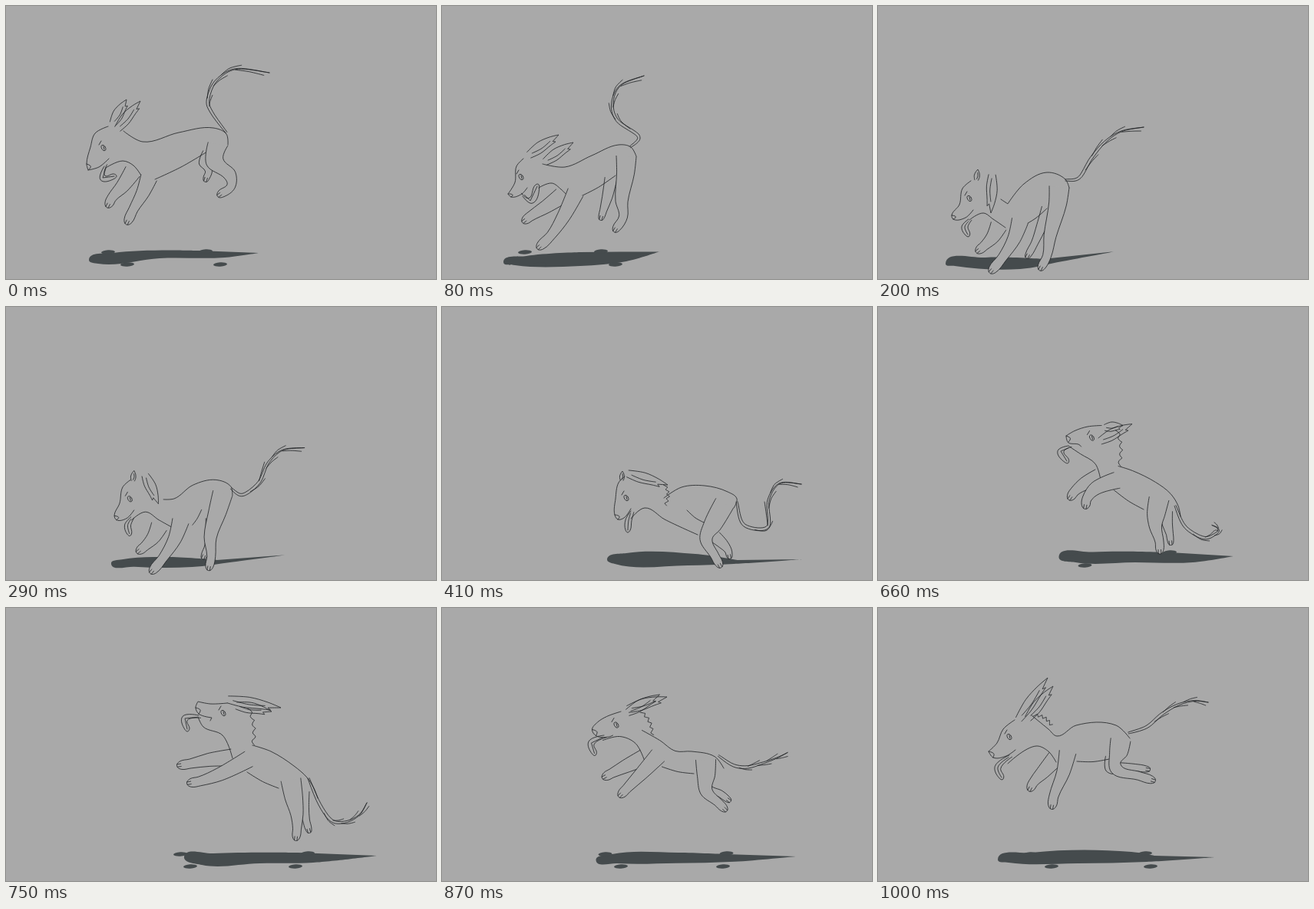
These frames come from a looping animation (560x356 px, 1.12 s). An HTML page with a canvas:

```html
<!DOCTYPE html>
<html lang="en">
<head>
<meta charset="utf-8">
<title>Leaping dog</title>
<style>
html, body { margin: 0; width: 100%; height: 100%; overflow: hidden; background: #a9a9a9; }
canvas { display: block; }
</style>
</head>
<body>
<canvas id="stage" width="560" height="356"></canvas>
<script>
const PAPER = '#a9a9a9', INK = '#1d2022', SHADE = '#454b4d';
const LOOP = 1120;
const ctx = document.getElementById('stage').getContext('2d');

// A pose is a rig: guide points for each part, outlines come from the rules below.
const pose = parts => Object.fromEntries(Object.entries(parts).map(
  ([name, text]) => [name, text.split(',').map(p => p.split(' ').map(Number))]));

const leap = pose({
  shadow: '329 322,285 328,200 329,120 336,108 331,140 322,250 319',
  farFore: '165 216,151 236,138 250,134 258',
  farHind: '264 192,258 206,264 215,261 224',
  fore: '186 224,178 244,166 265,159 280',
  hind: '276 180,272 203,292 221,293 235,280 245',
  tail: '287 165,268 139,263 122,274 97,300 82,343 87',
  back: '153 163,178 177,225 165,270 159,287 167,289 181',
  belly: '262 190,194 226',
  jaw: '130 211,152 202,166 208,179 226',
  face: '133 157,116 166,110 184,105 206,107 214,121 210,134 199',
  tongue: '128 209,126 224,141 222',
  farEar: '139 153,157 122', ear: '145 160,175 124', eye: '127 185'
});
const land = pose({
  shadow: '284 320,240 333,180 339,95 338,80 334,110 326,180 321',
  farFore: '155 248,135 262,114 275,109 279',
  farHind: '220 225,215 250,210 267,208 274',
  fore: '174 243,158 275,142 299,128 313',
  hind: '240 196,239 218,234 255,236 275,227 290',
  tail: '245 184,256 170,228 149,222 125,233 103,263 91',
  back: '131 206,160 210,195 195,230 181,246 184,253 196',
  belly: '226 221,181 248',
  jaw: '126 237,143 231,155 239,164 248',
  face: '106 199,97 209,95 230,86 245,90 249,104 245,111 237',
  tongue: '105 248,115 254,124 235',
  farEar: '113 194,152 168', ear: '134 203,171 178', eye: '103 223'
});
const stand = pose({
  shadow: '309 320,240 333,185 343,100 339,88 336,140 328,215 330',
  farFore: '157 287,149 302,138 313,132 318',
  farHind: '221 264,213 287,204 309,196 324',
  fore: '185 280,177 304,162 328,149 344',
  hind: '236 236,234 258,224 300,220 326,213 340',
  tail: '244 227,262 224,278 198,297 176,318 163,346 158',
  back: '160 252,169 258,190 232,220 217,244 226,249 237',
  belly: '220 264,190 286',
  jaw: '119 279,137 270,150 278,166 289',
  face: '121 228,110 238,106 259,96 273,98 278,114 276,124 266',
  tongue: '118 278,113 288,117 298',
  farEar: '128 227,130 213', ear: '149 220,147 270', eye: '119 251'
});
const crouch = pose({
  shadow: '469 329,380 335,320 337,225 335,215 329,240 321,330 322,385 330',
  farHind: '356 300,366 309,373 318,374 323',
  hind: '368 256,352 285,344 303,355 324,361 335',
  tail: '384 254,393 284,424 287,425 252,440 230,468 231',
  back: '289 249,312 235,342 233,372 241,384 250,380 262',
  belly: '319 265,341 281',
  jaw: '246 276,264 262,290 277,333 297',
  face: '238 221,230 229,226 250,225 271,229 277,237 275,246 263',
  tongue: '246 266,243 278,242 291',
  farEar: '234 226,235 214', ear: '242 217,294 232', eye: '240 249',
  mane: '290 232,290 259'
});
const rear = pose({
  shadow: '443 327,420 334,340 333,260 331,239 327,290 319,380 321',
  farFore: '281 249,274 263,272 278,275 289',
  farHind: '364 295,366 308,369 316,368 322',
  fore: '306 255,287 257,292 274,300 288',
  hind: '361 276,349 294,344 304,354 324,356 335',
  tail: '380 296,392 318,425 325,441 310,425 307,400 315',
  back: '305 236,318 240,348 251,370 266,381 284,382 298',
  belly: '300 263,337 293',
  jaw: '247 221,270 228,284 243,284 250',
  face: '294 185,280 187,262 201,243 206,244 215,256 216,263 217',
  tongue: '245 222,243 232,256 244',
  farEar: '290 187,292 174', ear: '289 230,304 175', eye: '274 204',
  mane: '306 191,306 236'
});
const launch = pose({
  shadow: '483 323,400 332,330 333,255 335,232 324,270 320,380 319',
  farFore: '294 195,264 198,240 203,228 205',
  farHind: '387 240,388 260,391 277,394 288',
  fore: '316 197,278 217,252 226,241 228',
  hind: '371 224,375 248,379 270,379 288,378 298',
  tail: '394 222,408 255,424 277,442 279,460 270,470 254',
  back: '321 179,345 187,375 206,392 221,401 235,406 248',
  belly: '314 214,355 235',
  jaw: '250 142,257 155,282 166,295 196',
  face: '288 124,266 125,250 122,247 130,251 138,268 143,266 147',
  tongue: '251 140,233 144,236 158',
  farEar: '300 127,346 135', ear: '289 119,358 130', eye: '283 137',
  mane: '316 131,321 179'
});
const glide = pose({
  shadow: '439 325,350 331,260 333,170 332,156 328,200 319,330 318,360 323',
  farFore: '231 196,214 215,202 228,199 234',
  farHind: '304 196,300 207,335 208,349 210',
  fore: '247 188,241 215,229 245,227 257',
  hind: '316 172,313 190,310 209,340 219,356 224',
  tail: '326 163,350 155,370 138,391 126,412 121,430 123',
  back: '200 140,222 158,233 167,258 153,310 153,328 170',
  belly: '259 200,301 197',
  jaw: '169 203,206 180,222 187,232 201',
  face: '178 146,163 158,155 176,144 187,150 195,167 193,179 185',
  tongue: '171 192,156 208,161 221',
  farEar: '183 145,221 91', ear: '195 144,228 102', eye: '171 168',
  mane: '203 140,226 154'
});

// start, pose, next pose, mix, sideways shift
const timeline = [
  [0, leap], [80, land], [160, land, stand, .5, -9], [200, stand],
  [290, stand, crouch, .35], [350, stand, crouch, .7], [410, crouch], [540, rear],
  [660, rear, launch, .5], [750, launch], [870, launch, glide, .5], [1000, glide]
];

const mix = (a, b, k) => [a[0] + (b[0] - a[0]) * k, a[1] + (b[1] - a[1]) * k];

function unit(a, b) {
  const x = b[0] - a[0], y = b[1] - a[1], l = Math.hypot(x, y) || 1;
  return [x / l, y / l];
}

// Point moved along direction d and across it.
const off = (p, d, along, across) =>
  [p[0] + d[0] * along - d[1] * across, p[1] + d[1] * along + d[0] * across];

const heading = (p, i) => unit(p[Math.max(i - 1, 0)], p[Math.min(i + 1, p.length - 1)]);

function pick(pts, u) {
  if (pts.length < 2) return pts[0];
  const x = u * (pts.length - 1), i = Math.min(Math.floor(x), pts.length - 2);
  return mix(pts[i], pts[i + 1], x - i);
}

function blend(a, b, k) {
  const n = Math.max(a.length, b.length), last = Math.max(n - 1, 1);
  return Array.from({ length: n }, (_, i) => mix(pick(a, i / last), pick(b, i / last), k));
}

// Smooth curve through points; turns beyond the limit stay sharp.
function trace(p, limit = .25) {
  const slope = i => {
    if (!i || i === p.length - 1) return [0, 0];
    const u = unit(p[i - 1], p[i]), v = unit(p[i], p[i + 1]);
    return u[0] * v[0] + u[1] * v[1] < limit ? [0, 0] : unit([0, 0], [u[0] + v[0], u[1] + v[1]]);
  };
  const path = new Path2D();
  path.moveTo(...p[0]);
  for (let i = 1; i < p.length; i++) {
    const d = Math.hypot(p[i][0] - p[i - 1][0], p[i][1] - p[i - 1][1]) / 3;
    path.bezierCurveTo(...off(p[i - 1], slope(i - 1), d, 0), ...off(p[i], slope(i), -d, 0), ...p[i]);
  }
  return path;
}

function line(p, limit) { ctx.stroke(trace(p, limit)); }

function leg(p, widths) {
  const end = p.length - 1, d = heading(p, end);
  const side = s => p.map((q, i) => off(q, heading(p, i), 0, s * widths[i]));
  const path = trace([...side(1), off(p[end], d, 5, 2), off(p[end], d, 5, -2), ...side(-1).reverse()], -.5);
  ctx.fill(path);
  ctx.stroke(path);
  for (const s of [-1.5, 2]) line([off(p[end], d, 0, s), off(p[end], d, 5, s)]);
}

function resample(p, n) {
  const at = i => p[Math.max(0, Math.min(p.length - 1, i))];
  return Array.from({ length: n + 1 }, (_, j) => {
    const x = j / n * (p.length - 1), i = Math.min(Math.floor(x), p.length - 2), t = x - i;
    return [0, 1].map(c => {
      const [a, b, e, f] = [at(i - 1)[c], at(i)[c], at(i + 1)[c], at(i + 2)[c]];
      return b + t / 2 * (e - a + t * (2 * a - 5 * b + 4 * e - f + t * (3 * (b - e) + f - a)));
    });
  });
}

function tail(p) {
  const n = 24, s = resample(p, n);
  for (const side of [-1, 1]) {
    line(s.map((q, i) => off(q, heading(s, i), 0, side * (1 + 2 * Math.sin(Math.PI * i / n)) * (1 - i / n))));
  }
  // Loose hairs leave the edges and sweep towards the tip.
  for (let i = 7; i < n - 4; i += 3) {
    const side = i % 2 ? 1 : -1;
    line([off(s[i], heading(s, i), 0, side), off(s[i + 2], heading(s, i + 2), 0, side * 3),
      off(s[i + 4], heading(s, i + 4), 0, side * 4.5)]);
  }
}

function ear([base, tip]) {
  const d = unit(base, tip), len = Math.hypot(tip[0] - base[0], tip[1] - base[1]);
  const w = Math.min(7, len * .25), at = (u, v) => off(base, d, u * len, v * w);
  const shape = [at(0, .7), at(.3, 1), at(.65, .8)];
  if (len > 20) shape.push(at(.82, .75), at(.76, .4));
  line([...shape, at(1, 0), at(.75, -.6), at(.4, -1), at(0, -.6)]);
  line([at(.1, .1), at(.4, .35), at(.7, .1)]);
}

function mane([from, to]) {
  const d = unit(from, to), len = Math.hypot(to[0] - from[0], to[1] - from[1]), n = 9;
  line(Array.from({ length: n + 1 }, (_, i) =>
    off(from, d, len * i / n, -4 * Math.sin(Math.PI * i / n) + (i % 2 ? -2.5 : 1.5))));
}

function head(rig) {
  const f = rig.face, [x, y] = rig.eye[0], [root, mid, tip] = rig.tongue;
  line(f);
  line([f[3], off(mix(f[3], f[4], .4), [1, 0], 4.5, 0), f[4]], -1);
  const d = heading(rig.tongue, 1), e = heading(rig.tongue, 2);
  line([root, off(mid, d, 0, 4), off(tip, e, 0, 3), off(tip, e, 3, 0),
    off(tip, e, 0, -3), off(mid, d, 0, -4), off(root, d, 1, -4)], -1);
  line([off(root, d, 3, 0), mid, tip]);
  ctx.beginPath();
  ctx.ellipse(x, y, 2.5, 4, -.5, 0, 7);
  ctx.moveTo(x, y - 2);
  ctx.lineTo(x + 1, y + 2);
  ctx.moveTo(x - 6, y - 4);
  ctx.lineTo(x - 3, y - 9);
  ctx.stroke();
}

function shadow(rig) {
  ctx.fillStyle = SHADE;
  ctx.fill(trace(rig.shadow, -1));
  for (const [name, y] of [['fore', 337], ['hind', 337], ['farFore', 321], ['farHind', 320]]) {
    const paw = rig[name]?.at(-1);
    if (!paw || paw[1] > 316) continue;
    ctx.beginPath();
    ctx.ellipse(paw[0] - 1, y, 9, 2.8, -.06, 0, 7);
    ctx.fill();
  }
  ctx.fillStyle = PAPER;
}

const foreWidths = [11, 8.5, 6, 5.5], hindWidths = [13, 11.5, 8, 5.5, 5], farWidths = [8, 6.5, 4.5, 4];

function dog(rig) {
  shadow(rig);
  if (rig.farFore) leg(rig.farFore, foreWidths);
  leg(rig.farHind, farWidths);
  tail(rig.tail);
  line(rig.back);
  const [a, b] = rig.belly, [mx, my] = mix(a, b, .5);
  line([a, [mx, my + 2], b]);
  line(rig.jaw);
  leg(rig.hind, hindWidths);
  if (rig.fore) leg(rig.fore, foreWidths);
  ear(rig.farEar);
  ear(rig.ear);
  if (rig.mane) mane(rig.mane);
  head(rig);
}

function between(a, b, k) {
  const move = [b.eye[0][0] - a.eye[0][0], b.eye[0][1] - a.eye[0][1]];
  const rig = {};
  for (const name in a) {
    // A part hidden in the next pose travels along with the head.
    rig[name] = blend(a[name], b[name] || a[name].map(p => off(p, move, 1, 0)), k);
  }
  return rig;
}

const drawings = timeline.map(([start, a, b, k, dx = 0]) => ({ start, dx, rig: b ? between(a, b, k) : a }));

function draw(now) {
  const t = now % LOOP;
  const { dx, rig } = drawings.filter(d => d.start <= t).pop();
  ctx.setTransform(1, 0, 0, 1, dx, 0);
  ctx.fillStyle = PAPER;
  ctx.fillRect(-dx, 0, 560, 356);
  ctx.strokeStyle = INK;
  ctx.lineWidth = .8;
  ctx.lineJoin = ctx.lineCap = 'round';
  dog(rig);
  requestAnimationFrame(draw);
}
draw(0);
</script>
</body>
</html>
```
